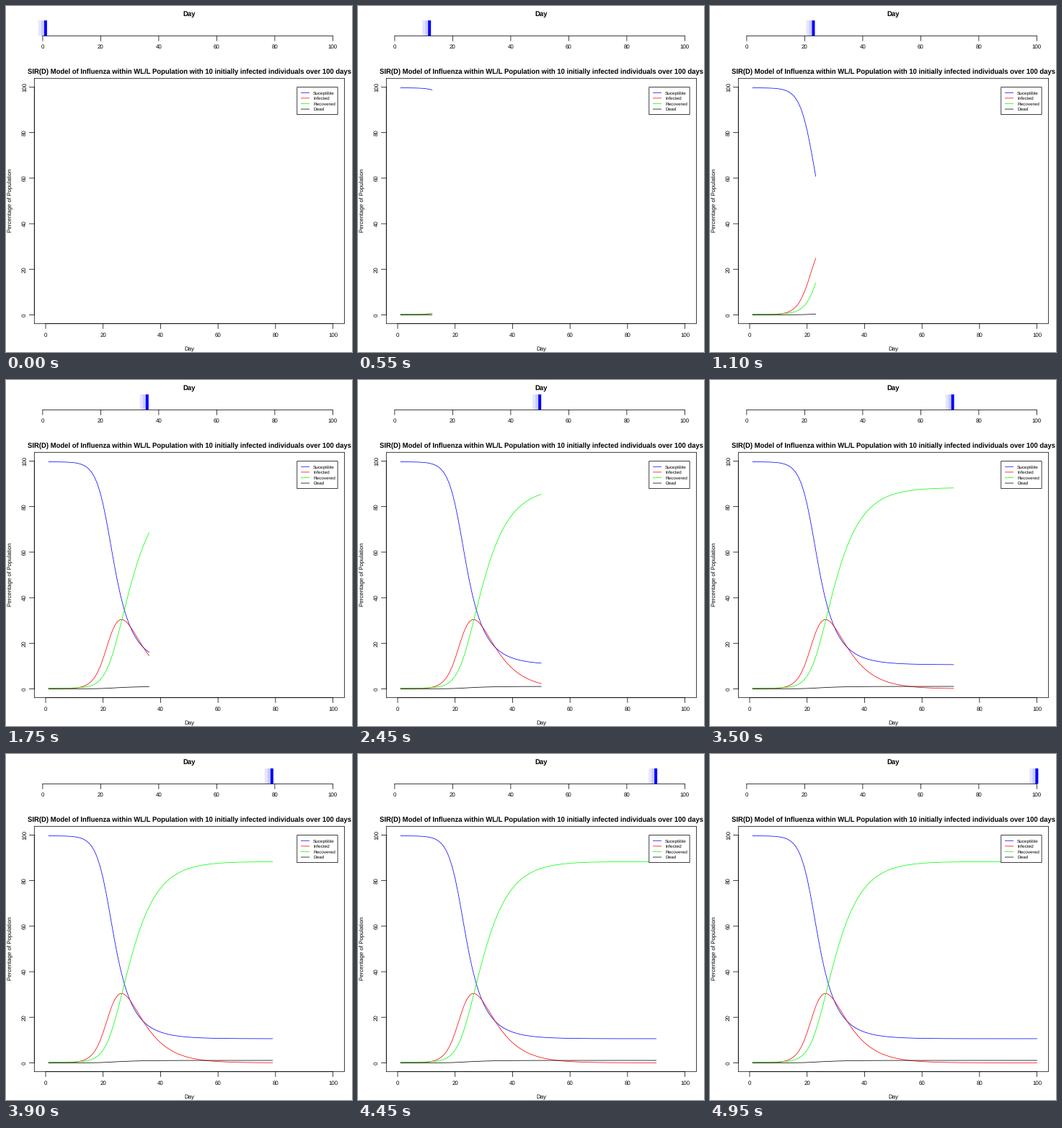
These frames come from a looping animation (480x480 px, 5000 ms). A matplotlib script:

```python
import numpy as np
import matplotlib
import matplotlib.pyplot as plt
from matplotlib.animation import FuncAnimation
from matplotlib.patches import Rectangle

matplotlib.rcParams["font.family"] = "Liberation Sans"
matplotlib.rcParams["text.hinting"] = "none"
matplotlib.rcParams["path.snap"] = False

DPI = 80
PX = 72 / DPI          # one pixel in points
LINE = 0.75 * PX
DAYS = 100
GAMMA = 0.168          # daily removal rate
FATALITY = 0.0118
BASE, TITLE, SMALL = 7.92, 9.5, 6.34
LEFT, TOP, RIGHT, BOTTOM = 39.3, 100.3, 469.5, 440.7
STRIP = 41.4           # height of the day strip's axis
TICK = 7


def beta(s):
    """Contact rate, falling as the most exposed people leave the pool."""
    return 0.338 + 0.352 * s * s


def step(s, i):
    new = beta(s) * s * i
    return s - new, i + new - GAMMA * i


def step_back(s1, i1):
    s = s1
    for _ in range(60):
        i = i1 / (1 - GAMMA + beta(s) * s)
        s = s1 + beta(s) * s * i
    return s, i


def epidemic(day=23, s=0.608, i=0.248):
    """Daily percentages, solved both ways from a known state."""
    states = [(s, i)]
    while len(states) < day:
        states.insert(0, step_back(*states[0]))
    while len(states) < DAYS:
        states.append(step(*states[-1]))
    s, i = np.array(states).T
    dead = FATALITY * (1 - s - 0.4 * i)
    recovered = np.maximum(1 - s - i - dead, 0)
    return [100 * v for v in (s, i, recovered, dead)]


def plot_x(day):
    return 55 + 3.986 * day


def plot_y(pct):
    return 428.4 - 3.159 * pct


def bar_x(day):
    return 50.9 + 4.025 * day


fig = plt.figure(figsize=(480 / DPI, 480 / DPI), dpi=DPI, facecolor="white")
ax = fig.add_axes([0, 0, 1, 1])
ax.set_xlim(0, 480)
ax.set_ylim(480, 0)
ax.axis("off")


def line(xs, ys, color="black", z=3):
    return ax.plot(xs, ys, color=color, lw=LINE, zorder=z,
                   solid_capstyle="round", solid_joinstyle="round")[0]


def label(x, y, text, size=BASE, ha="center", **kw):
    ax.text(x, y, text, size=size * PX, ha=ha, va="baseline",
            rotation_mode="anchor", zorder=7, **kw)


def box(x0, y0, x1, y1, fill, z):
    ax.add_patch(Rectangle((x0, y0), x1 - x0, y1 - y0, fc=fill, ec="black",
                           lw=LINE, zorder=z, joinstyle="round"))


def x_axis(to_px, y, text_y):
    line([to_px(0), to_px(100)], [y, y])
    for v in range(0, 101, 20):
        line([to_px(v)] * 2, [y, y + TICK])
        label(to_px(v), text_y, str(v))


# Day strip
label(254.3, 14, "Day", TITLE, weight="bold")
x_axis(bar_x, STRIP, 58.8)

# Main plot
label(254.1, 94, "SIR(D) Model of Influenza within WL/L Population with "
      "10 initially infected individuals over 100 days", TITLE, weight="bold")
box(LEFT, TOP, RIGHT, BOTTOM, "none", 3)
x_axis(plot_x, BOTTOM, 459)
line([LEFT, LEFT], [plot_y(0), plot_y(100)])
for v in range(0, 101, 20):
    line([LEFT - TICK, LEFT], [plot_y(v)] * 2)
    label(28, plot_y(v), str(v), rotation=90)
label(254.2, 478, "Day")
label(8.7, 270, "Percentage of Population", rotation=90)

# Curves and legend
names = ["Suceptible", "Infected", "Recovered", "Dead"]
colors = ["#0000ff", "#ff0000", "#00ff00", "#000000"]
series = epidemic()
curves = [line([], [], c, 2) for c in colors]
box(403.8, 112.6, 460.1, 150.6, "white", 5)
for k, (name, color) in enumerate(zip(names, colors)):
    y = 120.25 + 7.6 * k
    line([409.3, 420.8], [y, y], color, 6)
    label(426, y + 2.2, name, SMALL, ha="left")

# Current day and its two fading followers, each tucked under the next
shades = ["#0000ff", "#ccccff", "#e6e6ff"]
bars = [ax.add_patch(Rectangle((0, 20), 5 if k else 4, STRIP - 20, fc=c,
                               ec="none", zorder=2 - 0.1 * k))
        for k, c in enumerate(shades)]


def update(frame):
    day = frame + 1
    days = np.arange(1, day + 1)
    for curve, values in zip(curves, series):
        curve.set_data(plot_x(days), plot_y(values[:day]))
    # A single day is no line yet
    for curve in curves:
        curve.set_visible(day > 1)
    for k, bar in enumerate(bars):
        bar.set_x(bar_x(day - k) - 2)
    return curves + bars


anim = FuncAnimation(fig, update, frames=DAYS, interval=50, repeat=True,
                     repeat_delay=0, blit=False)
plt.show()
```
